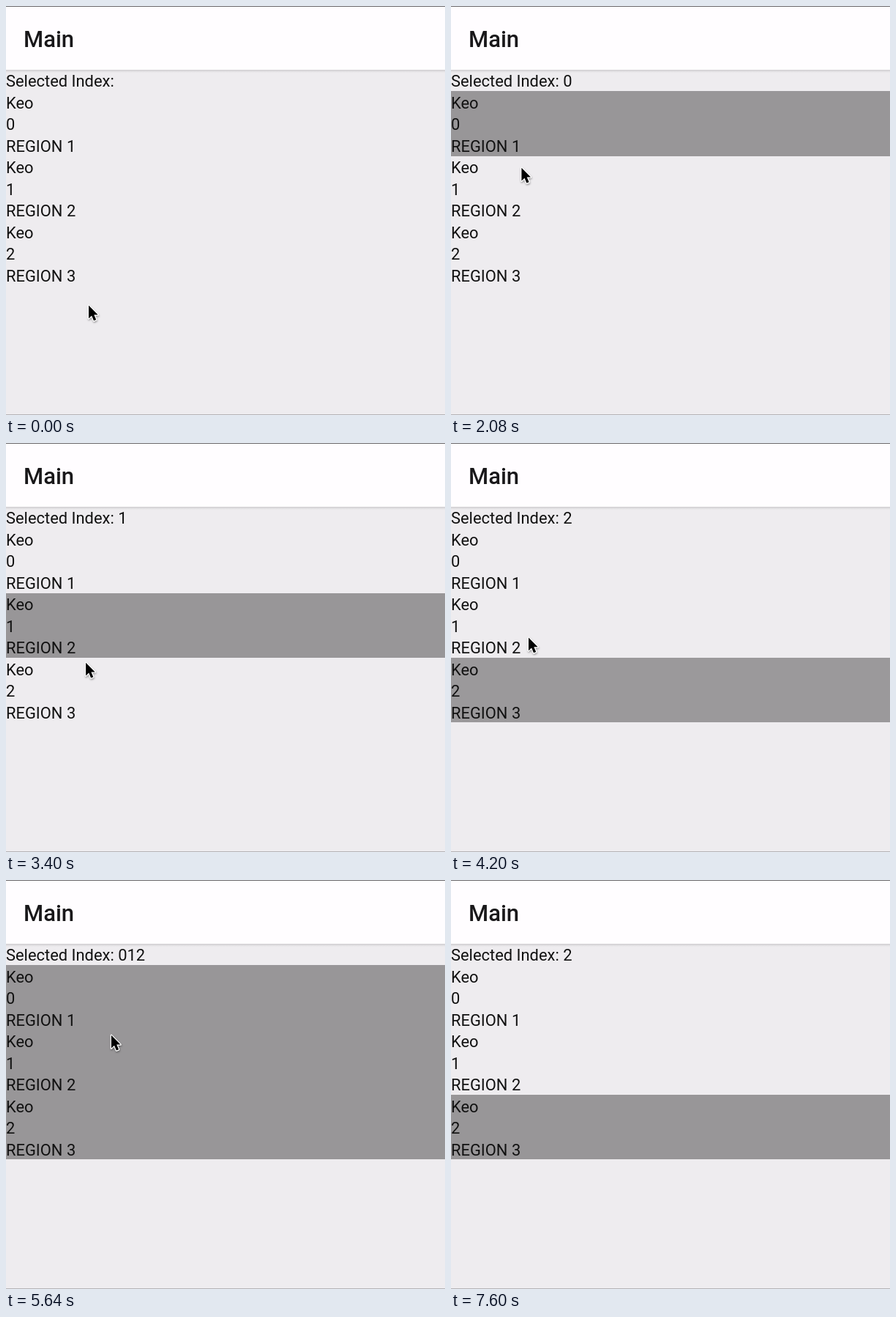
Recreate the animation shown at these times as an HTML page. Size 600x558 px, loop 9040 ms.

```html
<!DOCTYPE html>
<html lang="en">
<head>
<meta charset="utf-8">
<title>Main</title>
<style>
  html, body { margin: 0; width: 100%; height: 100%; overflow: hidden; background: #eeecef; }
  svg { display: block; width: 600px; height: 558px; }
  text { font: 21.9px Roboto, "Liberation Sans", sans-serif; fill: #111; white-space: pre; }
  .title { font-size: 31px; font-weight: 500; fill: #19181a; }
</style>
</head>
<body>
<svg viewBox="0 0 600 558">
  <defs>
    <linearGradient id="shade" x1="0" y1="0" x2="0" y2="1">
      <stop offset="0" stop-color="#000" stop-opacity=".13"/>
      <stop offset="1" stop-color="#000" stop-opacity="0"/>
    </linearGradient>
    <filter id="drop" x="-50%" y="-50%" width="200%" height="200%">
      <feDropShadow dx="0.5" dy="1.5" stdDeviation="1.2" flood-opacity=".4"/>
    </filter>
  </defs>
  <rect width="600" height="558" fill="#eeecef"/>
  <rect width="600" height="87" fill="#fffdff"/>
  <rect y="87" width="600" height="4" fill="url(#shade)"/>
  <rect width="600" height="1" fill="#69676a"/>
  <rect y="557" width="600" height="1" fill="#b5b3b6"/>
  <text class="title" x="24" y="56">Main</text>
  <g id="list"></g>
  <g id="cursor" filter="url(#drop)">
    <path d="M0 1.5V19.2L4.1 15.4L7 22.3L10.2 21L7.3 14.2H12.6Z"
      fill="#000" stroke="#fff" stroke-width="2.4" stroke-linejoin="round" paint-order="stroke"/>
  </g>
</svg>
<script>
const LOOP = 9040, STEP = 40, ROW = 29.47;
const CLICK_DELAY = 200, FADE = 420;

// Pointer moves; a click some time after arrival leaves these rows selected.
const moves = [
  { from: 0, to: 440, x: 257, y: 275 },
  { from: 440, to: 1160, x: 85, y: 128, rows: '0' },
  { from: 1660, to: 2400, x: 104, y: 280, rows: '1' },
  { from: 3160, to: 3600, x: 113, y: 312, rows: '2' },
  { from: 3880, to: 4200, x: 106, y: 264, rows: '12' },
  { from: 4440, to: 4960, x: 166, y: 150, rows: '012' },
  { from: 5360, to: 5960, x: 117, y: 284, rows: '02' },
  { from: 6080, to: 6880, x: 115, y: 165, rows: '2' },
  { from: 7160, to: 7600, x: -30, y: 500 }
];

const list = document.getElementById('list');
const cursor = document.getElementById('cursor');
const clamp = u => Math.max(0, Math.min(1, u));
const ease = u => u * u * (3 - 2 * u);

function add(tag, attrs, label = '') {
  const el = document.createElementNS('http://www.w3.org/2000/svg', tag);
  for (const key in attrs) el.setAttribute(key, attrs[key]);
  el.textContent = label;
  return list.appendChild(el);
}

const edge = i => Math.round(116.2 + i * ROW * 3);
const line = (n, label) => add('text', { x: 0, y: 110.3 + n * ROW }, label);

const bands = [0, 1, 2].map(i =>
  add('rect', { y: edge(i), width: 600, height: edge(i + 1) - edge(i), fill: '#989698' }));
const header = line(0, '');
bands.forEach((_, i) =>
  ['Keo', i, 'REGION ' + (i + 1)].forEach((label, k) => line(1 + i * 3 + k, label)));

function draw(time) {
  const t = Math.floor(time % LOOP / STEP) * STEP;
  let x = 113, y = 407, rows = '';
  const since = [];

  for (const m of moves) {
    const u = ease(clamp((t - m.from) / (m.to - m.from)));
    x += (m.x - x) * u;
    y += (m.y - y) * u;

    const click = m.to + CLICK_DELAY;
    if (m.rows && t >= click) {
      bands.forEach((_, i) => { if (!rows.includes(i)) since[i] = click; });
      rows = m.rows;
    }
  }

  header.textContent = 'Selected Index: ' + rows;
  bands.forEach((band, i) =>
    band.setAttribute('opacity', rows.includes(i) ? clamp((t - since[i]) / FADE) : 0));
  cursor.setAttribute('transform', `translate(${x.toFixed(1)} ${y.toFixed(1)})`);
}

const start = performance.now();
function tick() {
  draw(performance.now() - start);
  requestAnimationFrame(tick);
}
tick();
</script>
</body>
</html>
```
